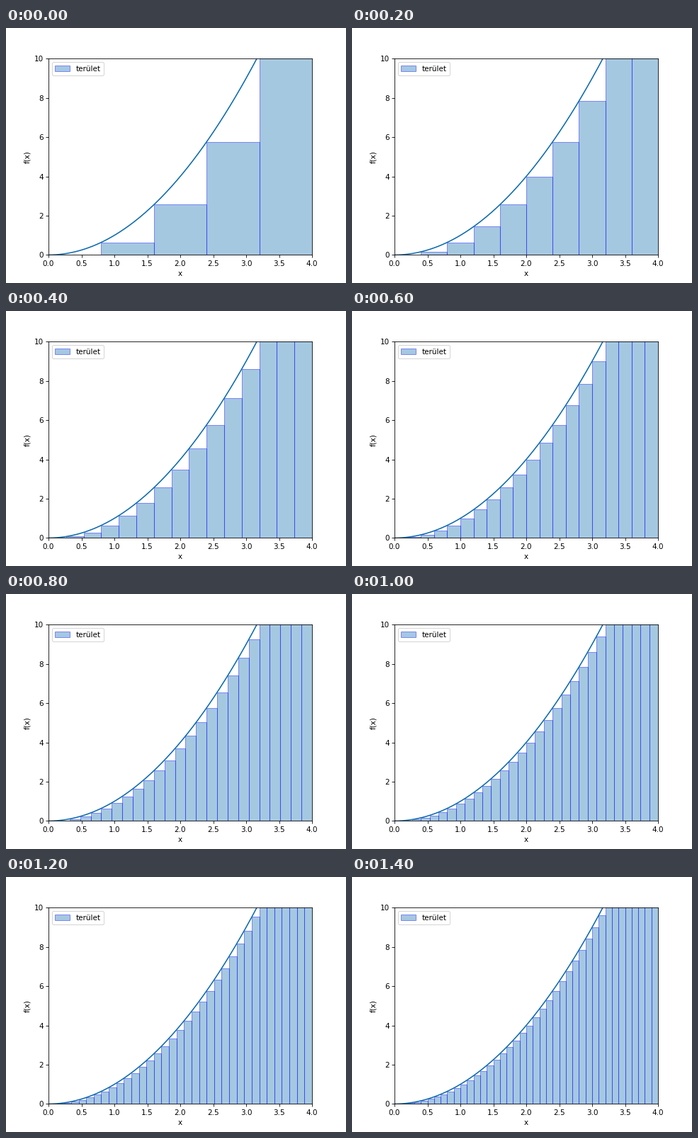
Animation of 480x360 px, one loop 1.6 s. Source, as a matplotlib script:

```python
import numpy as np
import matplotlib.pyplot as plt
from matplotlib.animation import FuncAnimation

X_MAX, Y_MAX = 4, 10
STEP = 5
FRAMES = 8

fig, ax = plt.subplots(figsize=(6.4, 4.8), dpi=75)


def f(x):
    return x ** 2


def update(frame):
    """Draw the lower Riemann sum, with five more bars on every frame."""
    ax.clear()
    count = STEP * (frame + 1)
    width = X_MAX / count
    left = np.arange(count) * width
    ax.bar(left, f(left), width, align="edge", color="C0",
           edgecolor="blue", alpha=0.4, label="terület")

    x = np.linspace(0, X_MAX, 200)
    ax.plot(x, f(x), color="#0a69ad")
    ax.set(xlim=(0, X_MAX), ylim=(0, Y_MAX), xlabel="x", ylabel="f(x)")
    ax.legend(loc="upper left")


anim = FuncAnimation(fig, update, frames=FRAMES, interval=200, repeat=True)
plt.show()
```
